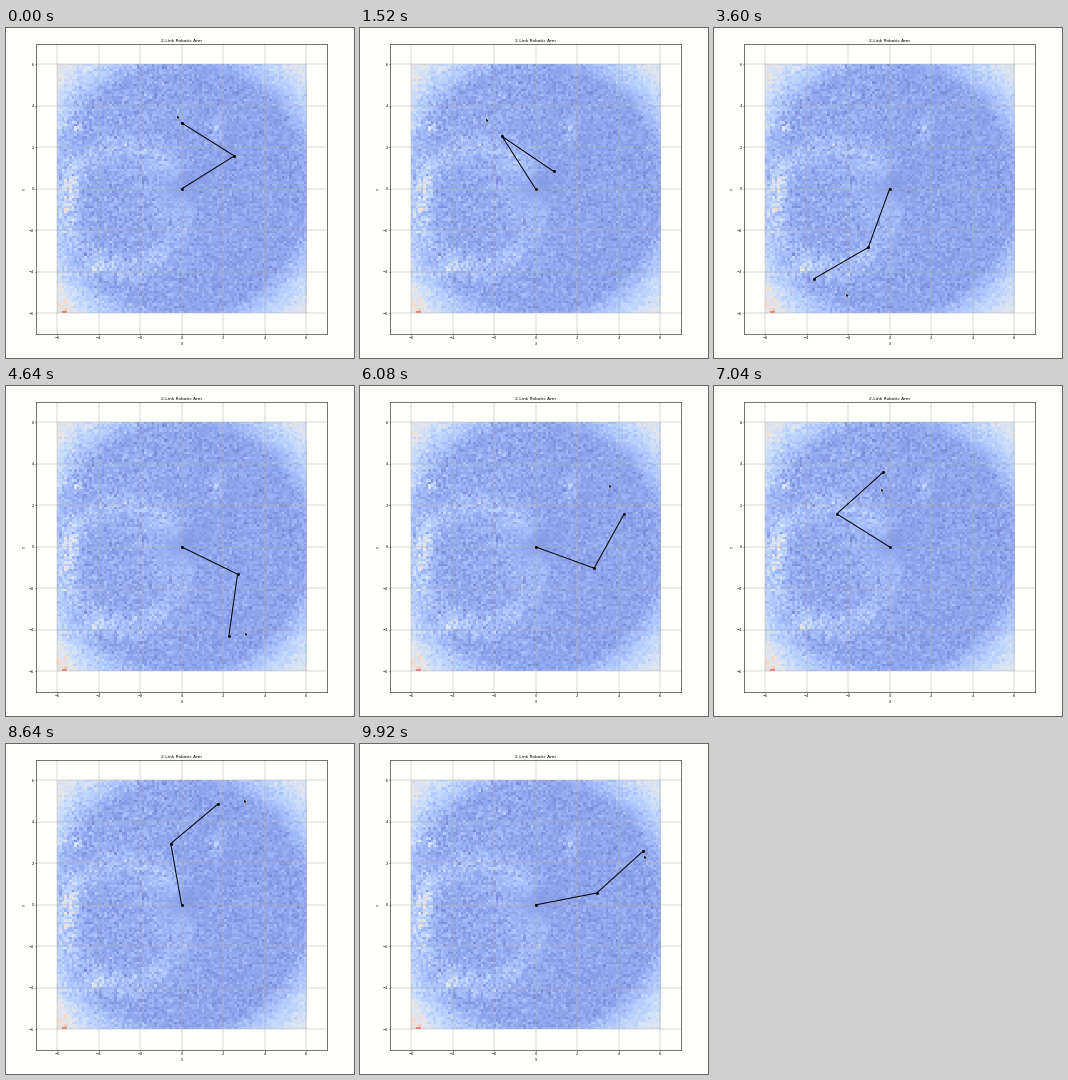
Write a matplotlib script that moves like this. It is 348x330 px and loops after 10000 ms.

```python
import numpy as np
import matplotlib.pyplot as plt
from matplotlib.animation import FuncAnimation

W, H, DPI = 348, 330, 24
FRAMES, STEP_MS = 125, 80
HOLD, LAG = 10, 3  # opening pause, steps by which the arm trails the pointer
LINK = 3.0
BG = "#fefefb"
UNIT = 20.75       # pixels per data unit
CX, CY = 175.6, 160.9

# Key poses: step, shoulder angle, forearm heading (degrees, unwrapped)
POSES = np.array([
    (10, 32, 148), (13, 38, 147), (23, 184, 460), (31, 239, 551),
    (34, 241, 534), (38, 208, 508), (45, 250, 570), (58, 334, 622),
    (61, 336, 637), (68, 319, 741), (76, 340, 781), (79, 439, 720),
    (88, 508, 762), (91, 520, 755), (100, 540, 740), (108, 460, 760),
    (111, 431, 766), (124, 371, 762), (127, 367, 760),
])


def monotone_slopes(t, v):
    """Harmonic-mean slopes, flat at turning points."""
    d = np.diff(v) / np.diff(t)
    a, b = d[:-1], d[1:]
    same = a * b > 0
    inner = np.where(same, 2 * a * b / np.where(same, a + b, 1), 0)
    return np.concatenate([d[:1], inner, d[-1:]])


def ease(t, v, x):
    """Monotone cubic interpolation of v(t)."""
    m = monotone_slopes(t, v)
    i = np.clip(np.searchsorted(t, x, side="right") - 1, 0, len(t) - 2)
    dt = t[i + 1] - t[i]
    u = (x - t[i]) / dt
    return (v[i] + (v[i + 1] - v[i]) * u * u * (3 - 2 * u)
            + dt * u * (1 - u) * (m[i] * (1 - u) - m[i + 1] * u))


def joints(t):
    """Base, elbow and tip as complex numbers."""
    angles = np.radians([ease(POSES[:, 0], POSES[:, c], t) for c in (1, 2)])
    return np.cumsum([0, *(LINK * np.exp(1j * angles))])


def error_map(n=100):
    rng = np.random.default_rng(7)
    c = (np.arange(n) + 0.5) / n * 12 - 6
    x, y = np.meshgrid(c, c)

    def blob(x0, y0, sx, sy):
        return np.exp(-((x - x0) / sx) ** 2 - ((y - y0) / sy) ** 2)

    r = np.hypot(x, y)
    ring = np.exp(-((np.hypot(x + 2.7, y + 0.9) - 2.9) / 0.55) ** 2)
    left = 1 / (1 + np.exp((x + 0.2) / 0.6))
    v = 0.12 + 0.02 * left
    v += 0.09 * ring * (0.3 + 0.7 * left)
    v += 0.07 * blob(-0.6, -0.1, 1.2, 1.5)
    v -= 0.13 * blob(-0.05, 0.1, 0.8, 0.8)
    v += 0.03 / (1 + np.exp((6.4 - r) / 0.15))
    v += 0.13 * np.clip(r - 5.9, 0, None)
    v += 0.05 * np.exp(-(x + 6) / 0.35)

    rough = 0.035 + 0.012 * left + 0.015 * ring * left
    v += rng.normal(0, 1, v.shape) * rough * np.clip(r / 1.5, 0.1, 1)
    spots = (0.35 * blob(-5.4, 0, 0.4, 2) + 0.35 * blob(-5.2, 2.95, 0.7, 0.22)
             + 0.3 * blob(1.6, 2.9, 0.3, 0.5) + 0.3 * blob(-4, -3.9, 0.5, 0.4)
             + 0.15 * blob(-5.6, -5.6, 0.5, 0.5))
    v += spots * rng.random(v.shape) ** 2
    v[0, 2:4] = 0.9
    return np.clip(v, 0.02, 1)


plt.rcParams["font.family"] = "DejaVu Sans"
fig = plt.figure(figsize=(W / DPI, H / DPI), dpi=DPI, facecolor=BG)
size = 14 * UNIT
ax = fig.add_axes([(CX - size / 2) / W, 1 - (CY + size / 2) / H,
                   size / W, size / H], facecolor=BG)
ax.imshow(error_map(), cmap="coolwarm", vmin=0, vmax=1, alpha=0.7,
          origin="lower", extent=(-6, 6, -6, 6), interpolation="nearest")
ticks = range(-6, 7, 2)
ax.set(xlim=(-7, 7), ylim=(-7, 7), xticks=ticks, yticks=ticks,
       xlabel="X", ylabel="Y")
ax.set_title("2-Link Robotic Arm", fontsize=13)
ax.tick_params(labelsize=11, width=1.6)
ax.grid(True, lw=1.4)
ax.spines[:].set_linewidth(1.6)

arm, = ax.plot([], [], "o-", color="black", lw=3, ms=8, zorder=3)
arrow = np.array([(-0.6, 1), (-0.6, -0.7), (-0.2, -0.35), (0.1, -1),
                  (0.4, -0.85), (0.1, -0.2), (0.6, -0.2), (-0.6, 1)])
pointer, = ax.plot([], [], ls="", marker=arrow, ms=15, mfc="black",
                   mec="white", mew=0.8, zorder=4)


def update(k):
    t = max(k, HOLD)
    p = joints(t)
    arm.set_data(p.real, p.imag)
    goal = joints(t + LAG)[-1]
    pointer.set_data([goal.real], [goal.imag])
    return arm, pointer


anim = FuncAnimation(fig, update, frames=FRAMES, interval=STEP_MS,
                     repeat=True, repeat_delay=0, blit=False)
plt.show()
```
